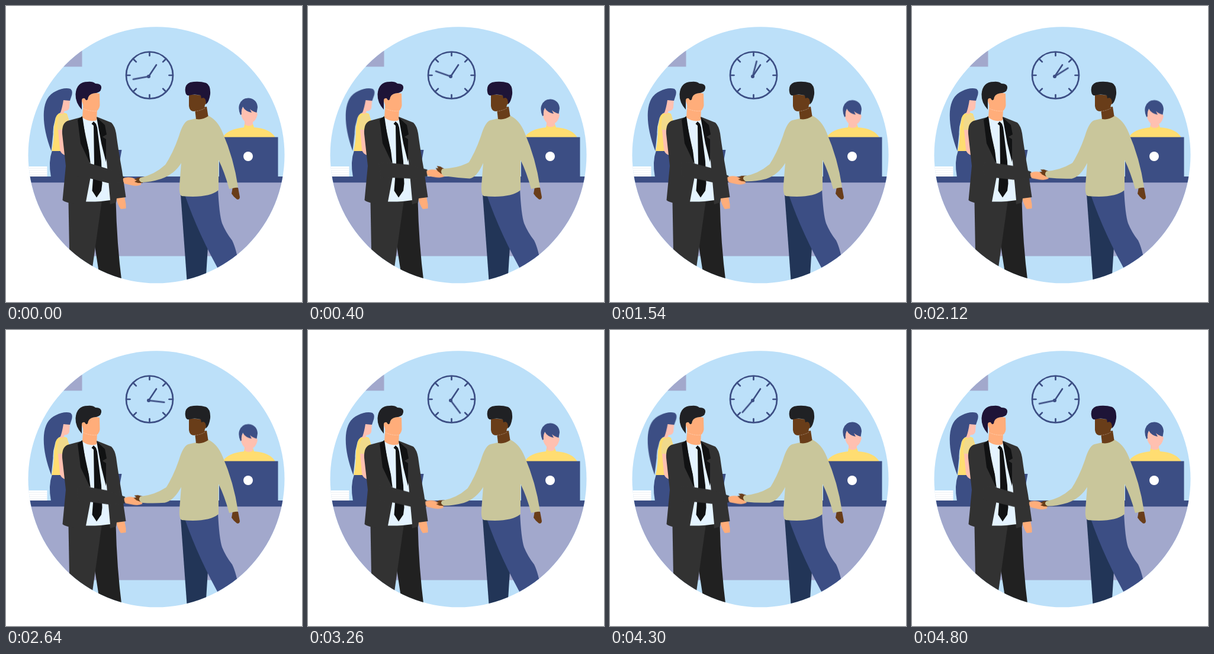
These frames come from a looping animation (500x500 px, 4820 ms). An HTML page without scripts:

```html
<!DOCTYPE html>
<html lang="en">
<head>
<meta charset="utf-8">
<title>Office handshake</title>
<style>
  html, body { margin: 0; width: 100%; height: 100%; overflow: hidden; background: #fff; }
  svg { display: block; width: 100vw; height: 100vh; }
  .navy { fill: #3c4e84; }
  .lilac { fill: #a2a8cc; }
  .yellow { fill: #ffdd71; }
  .sleeve { fill: #f1da8b; }
  .pink { fill: #ffc0b0; }
  .peach { fill: #ffad7a; }
  .brown { fill: #693d19; }
  .suit { fill: #323232; }
  .dark { fill: #212121; }
  .black { fill: #111213; }
  .shirt { fill: #e4f3ff; }
  .sweater { fill: #c9c69b; }
  .jaw { fill: none; stroke: #fff; stroke-width: .5; stroke-dasharray: 3 1; opacity: .6; }
  .clock { fill: none; stroke: #3c4e84; stroke-width: 2.7; stroke-linecap: round; }

  .minute { transform-origin: 241px 119px; animation: sweep 4820ms linear infinite; }
  .hair { fill: #1e1437; animation: tint 4820ms step-end infinite; }
  .tilt { transform-origin: 97px 182px; animation: tilt 4820ms ease-in-out infinite; }
  .nod { animation: nod 4820ms ease-in-out infinite; }
  .shake, .forearm { animation: shake calc(4820ms / 12) linear infinite alternate; }
  .forearm { animation-name: bend; }
  .suit-arm { transform-origin: 138px 275px; --pose: rotate(-11.5deg); }
  .suit-hand { transform-origin: 200px 295px; --pose: rotate(8deg); }
  .knit-hand { transform-origin: 228px 294px; --pose: translate(-2px, -16px) rotate(38deg); }

  @keyframes sweep { from { transform: rotate(259.5deg); } to { transform: rotate(619.5deg); } }
  @keyframes shake { to { transform: var(--pose); } }
  @keyframes bend {
    from { d: path("M227 290Q251 285 268 269L287 258L296 265Q283 285 262 292Q243 298 229 298Q222 294 227 290Z"); }
    to { d: path("M227 275Q251 274 268 266L287 256L296 265Q285 290 273 291.5Q250 290 229 287Q222 280 227 275Z"); }
  }
  @keyframes tint { 22.6%, 90% { fill: #202124; } 90.05%, 100% { fill: #1e1437; } }
  @keyframes tilt {
    0%, 5%, 30%, 68%, 93%, 100% { transform: none; }
    14%, 20%, 77%, 83% { transform: rotate(3.7deg); }
  }
  @keyframes nod {
    0%, 2%, 78%, 100% { transform: none; }
    14%, 58% { transform: translateY(3.5px); }
  }
</style>
</head>
<body>
<svg viewBox="0 0 500 500">
  <defs>
    <clipPath id="round"><circle cx="254" cy="251.800" r="216.500"/></clipPath>
    <path id="tick" d="M0-38V-33"/>
    <path id="short" d="M0-37.500V-32"/>
  </defs>

  <g clip-path="url(#round)">
    <path fill="#bce0f9" d="M0 0H500V500H0Z"/>
    <path class="lilac" d="M60 40H128.500V102.500H60Z"/>

    <g class="clock">
      <g transform="translate(242.500 117)">
        <circle r="39.500"/>
        <use href="#tick"/>
        <use href="#tick" transform="rotate(90)"/>
        <use href="#tick" transform="rotate(180)"/>
        <use href="#tick" transform="rotate(270)"/>
        <use href="#short" transform="rotate(45)"/>
        <use href="#short" transform="rotate(135)"/>
        <use href="#short" transform="rotate(225)"/>
        <use href="#short" transform="rotate(315)"/>
      </g>
      <path d="M241 119L254 99.500"/>
      <path class="minute" d="M241 119V92.500"/>
    </g>
    <circle class="navy" cx="241" cy="119" r="3"/>

    <!-- receptionist -->
    <path class="yellow" d="M366 222Q374 208 402 205L403 199H417L419 205Q446 207 455 222Z"/>
    <g class="nod">
      <path class="pink" d="M397 178Q399 168 406 171L423 179Q426 182 424 186Q422 193 417 196V200Q410 205 403 200V195Q396 188 397 178Z"/>
      <path class="navy" d="M396 184Q392 175 394 167Q398 155 410 155.500Q424 157 425 171L423.500 180Q416 178 412 174L415 180Q404 178 400 170Q397 176 398 183Z"/>
    </g>

    <!-- desk -->
    <path class="lilac" d="M30 298H480V422.500H30Z"/>
    <path class="navy" d="M30 288H480V298.300H30ZM360 221.500H459.500V290H360ZM180 243H195.500L187 290H180Z"/>
    <circle cx="409" cy="254" r="8" fill="#fff"/>
    <path fill="#fff" d="M30 271H69.500V288H30Z"/>
    <path d="M30 274.500H69M30 278H69M30 281.500H69M30 285H69" stroke="#e6e9ef" stroke-width=".6"/>

    <!-- woman -->
    <path class="navy" d="M78 244H101L106 289H76Q71 263 78 244Z"/>
    <path class="yellow" d="M85 183Q95 178 103 182L107 195L100 245H77Q81 230 81 205Z"/>
    <path class="sleeve" d="M90 186Q98 179 104 186L107 210H87Q86 194 90 186Z"/>
    <path class="pink" d="M88 209H95L102 240V253Q92 250 91 242Z"/>
    <g class="tilt">
      <path class="pink" d="M95 157H108L107 172Q105 178 99 177L97 182L91 182Z"/>
      <path class="navy" d="M84 144Q98 137 109 140Q114 144 110 154L108 160L97 159Q95 172 92 180Q84 183 82.500 194Q79 205 79.500 216L76.500 245Q62 207 64 178Q66 152 84 144Z"/>
    </g>

    <!-- man in suit -->
    <path class="dark" d="M159 328H185.500Q187 400 196 470H160L150 405Z"/>
    <path class="suit" d="M105.500 330L108 470H142L162 328Z"/>
    <path class="peach" d="M186 324L200 322L202.500 335V342L194 343Q189 337 186 324Z"/>
    <path class="suit" d="M130 187L104 194Q94 198 95 216L101 270L95.500 328Q104 335 136 335L175 328L176 335L186 332L187 325L202.500 323L196 278Q190 245 186 215Q184 203 178 197L153 187Z"/>
    <path class="shirt" d="M128 188L140 192L154 190L161 225L170 262L176 328Q158 331 135 330.500L143 288L140 245Z"/>
    <path class="black" d="M148 195L152 199L154 205L161 262L162.500 300L161 312L153 323.500L145.500 312L149 265L148 202L144.500 199Z"/>
    <path class="black" d="M129 186L121 192L126 232L143 268L140 245L134 220ZM153 188L167 201L170 217L163 221L169 225V264L161 232Z"/>
    <path class="peach" d="M131 160L129 188Q140 197 153 193L154 174Z"/>
    <path class="peach" d="M137 150Q150 145 158 148L158.500 168Q157 178 149 178Q137 177 132 172L127 158Z"/>
    <path class="jaw" d="M130 173Q143 179 155 177"/>
    <path class="hair" d="M128 175Q117 163 117.500 149Q119 128 138 128Q146 127 151 131Q162 131 161 139Q160 147 148 147.500Q139 149 138 158Q135 161 133 156Q128 155 128 160Z"/>

    <g class="shake suit-arm">
      <path class="suit" d="M122 262L139 265L172 275L200 289L198 300L172 299L141 291L120 287Z"/>
      <path class="peach shake suit-hand" d="M198 291Q204 288 213 290L223 294Q229 298 228 302Q221 305 213 303L200 300Q197 296 198 291Z"/>
    </g>

    <!-- man in sweater -->
    <path fill="#223557" d="M295 318L306 470H337L341.500 400L325 318Z"/>
    <path class="navy" d="M302 319L358 308Q360 352 365 367Q371 382 382 396Q389 410 394 440L365 456Q325 386 302 319Z"/>
    <path class="brown" d="M383 306L392 307L395 323Q394 328 390 326.500Q384 322 381 317Z"/>
    <path class="brown shake knit-hand" d="M216.500 293L222 290L231 289V299L223 299L217 297L221 294.500Z"/>
    <path class="sweater forearm" d="M227 290Q251 285 268 269L287 258L296 265Q283 285 262 292Q243 298 229 298Q222 294 227 290Z"/>
    <path class="sweater" d="M321 190Q332 192 341 185Q357 192 366 214Q385 258 392 306L377 309Q369 280 359 260L359 311Q342 325 297 321Q292 319 293 303L296 265Q290 275 281 282L268 270Q282 249 292 220Q299 196 308 193Z"/>
    <path class="brown" d="M319 174L339 170L341.500 186Q332 193 321 191Z"/>
    <path class="brown" d="M309 149L333 151L340 155Q341 163 336 167L335 173Q329 177 318 178Q310 178 309 169Z"/>
    <path class="jaw" d="M318 178Q329 177 337 172"/>
    <path class="hair" d="M303 145Q301 133 311 129Q325 126 338 130Q346 134 345 149Q343 162 338 166Q338 155 333 155L330 156L329 151Q318 148 309 151Q304 152 303 145Z"/>
  </g>
</svg>
</body>
</html>
```
